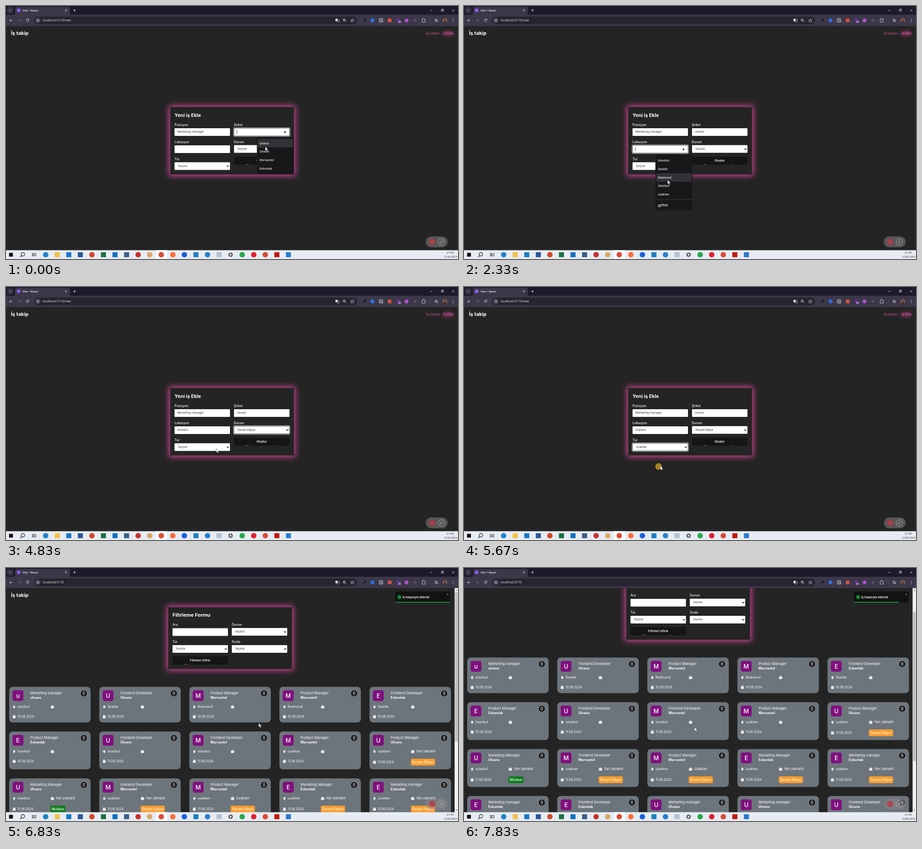
An HTML page that plays this animation: 999 px wide and 561 px high, repeating every 8 s.

```html
<!DOCTYPE html>
<html lang="tr">
<head>
<meta charset="utf-8">
<title>İş takip</title>
<style>
html, body { margin: 0; width: 100%; height: 100%; overflow: hidden; background: #242424; }
svg { display: block; width: 100vw; height: 100vh; }
text { font-family: Inter, "Open Sans", sans-serif; white-space: pre; }
.ui { font-family: "Open Sans", "Noto Sans", sans-serif; }
</style>
</head>
<body>
<svg id="stage" viewBox="0 0 999 561"></svg>
<script>
const LOOP = 8000, FPS = 6;
const DARK = '#242424', PINK = '#d6479a';
const STATES = ['Seçiniz', 'Mülakat', 'Devam Ediyor', 'Reddedildi'];
const TYPES = ['Seçiniz', 'Tam zamanlı', 'Yarı zamanlı', 'Uzaktan'];
const COMPANIES = ['ulvano', 'Ulvano', 'Morvantel', 'Eskonlab'];
const PLACES = ['istanbul', 'Seattle', 'Redmond', 'İstanbul', 'uzaktan', 'ggfffdd'];

// ---- markup helpers ----
const rect = (x, y, w, h, fill, extra = '') =>
  `<rect x="${x}" y="${y}" width="${w}" height="${h}" fill="${fill}" ${extra}/>`;
const dot = (x, y, r, fill, extra = '') => `<circle cx="${x}" cy="${y}" r="${r}" fill="${fill}" ${extra}/>`;
const line = (d, color = '#dcdae2', w = 1, extra = '') =>
  `<path d="${d}" fill="none" stroke="${color}" stroke-width="${w}" ${extra}/>`;
const text = (x, cy, s, size, fill = '#fff', weight = 400, extra = '') =>
  `<text x="${x}" y="${cy + size * 0.36}" font-size="${size}" fill="${fill}" font-weight="${weight}" ${extra}>${s}</text>`;
const group = (id, body, extra = '') => `<g id="${id}" ${extra}>${body}</g>`;
const MID = 'text-anchor="middle"', END = 'text-anchor="end"', UI = 'class="ui"';

const label = (x, y, s) => text(x, y, s, 7, '#fff', 500);
const input = (x, y, id, value = '') =>
  rect(x, y, 122.5, 17, '#fff', 'rx="1.2"') + text(x + 6, y + 8, value, 6.4, '#3c3c3c', 400, `id="${id}"`);
const select = (x, y, id) =>
  rect(x, y, 122.5, 17, '#fff', 'rx="1.2"') + text(x + 7.5, y + 8.2, 'Seçiniz', 6.1, '#333', 400, `id="${id}"`) +
  line(`M${x + 115.5} ${y + 7.4}l2.2 2.3 2.2-2.3`, '#111', 1.3);
const ring = (id, x, y, body = '') => group(id,
  rect(x - 0.2, y - 0.2, 123, 17.4, 'none', 'rx="1.5" stroke="#111" stroke-width="1"') +
  rect(x - 1, y - 1, 124.6, 19, 'none', 'rx="2" stroke="#fff" stroke-width="0.9"') + body);
const listArrow = (x, y) => `<path d="M${x + 110} ${y + 7.5}h5l-2.5 4z" fill="#111"/>`;
const caret = (x, y) => rect(x + 6, y + 4, 0.8, 9, '#222', 'data-caret=""');
const panelRow = (y0, i) => y0 + 13.2 + 18.8 * i + (i > 4 ? 4.5 : 0);
const panel = (id, x, y, h, items) => group(id,
  rect(x, y, 81.5, h, '#18171a', 'rx="2"') + rect(x + 1.5, 0, 78.5, 18.8, '#333236', `id="${id}Hover"`) +
  (items.length > 5 ? rect(x, y + 99, 81.5, 0.8, '#444348') : '') +
  items.map((s, i) => text(x + 5.8, panelRow(y, i), s, 6.4, '#e8e8ea', 600, UI)).join(''));
const popup = (id, x, y, items) => group(id,
  rect(x, y, 122.5, 41, '#fff', 'stroke="#777" stroke-width="0.7"') +
  rect(x + 0.4, 0, 121.7, 10, '#1768d0', `id="${id}Hover"`) +
  items.map((s, i) => text(x + 8, y + 6 + i * 10, s, 6.3, '#333', 400, `data-row="${i}"`)).join(''));
const box = (x, y, w, h) =>
  rect(x - 3, y - 3, w + 6, h + 6, PINK, 'filter="url(#glow)" opacity="0.95"') + rect(x, y, w, h, DARK);
const button = (x, y, s, id) => {
  const blob = (n, cx, cy) => dot(x + cx, y + cy, 11.5, PINK, `id="${id}${n}"`);
  return `<clipPath id="${id}Clip">${rect(x, y, 122.5, 18, '#000', 'rx="3"')}</clipPath>` +
    group(id, rect(x, y, 122.5, 18, '#151516') + blob('L', 29, 28.4) + blob('R', 88.5, 28.9) + blob('T', 51, -13),
      `clip-path="url(#${id}Clip)"`) +
    text(x + 61, y + 9, s, 6.3, '#fff', 600, MID);
};

// ---- page with the new-job form ----
const formPage = () => text(11, 60, 'İş takip', 11, '#fff', 700) +
  `<ellipse cx="977" cy="61" rx="13" ry="6" fill="${PINK}" opacity="0.42" filter="url(#soft)"/>` +
  text(958, 60.5, 'İş Listesi', 7.2, '#d44d95', 500, END) + text(989, 60.5, 'İş Ekle', 7, '#dd5a9f', 500, END) +
  box(363, 224, 273.5, 149.5) + text(372.5, 242, 'Yeni iş Ekle', 10.7, '#fff', 700) +
  label(372.5, 263, 'Pozisyon') + input(372.5, 271, 'position', 'Merketing manager') +
  label(503.5, 263, 'Şirket') + input(504, 271, 'company') +
  label(372.5, 301, 'Lokasyon') + input(372.5, 309, 'place') +
  label(503.5, 301, 'Durum') + select(504, 308.5, 'state') +
  label(372.5, 339, 'Tür') + select(372.5, 346.5, 'type') +
  button(504, 334, 'Oluştur', 'create') +
  ring('companyRing', 504, 271, listArrow(504, 271) + caret(504, 271)) +
  ring('placeRing', 372.5, 309, listArrow(372.5, 309) + caret(372.5, 309)) +
  ring('stateRing', 504, 308.5) + ring('typeRing', 372.5, 346.5) +
  panel('companyList', 554.5, 291, 81.5, COMPANIES) + panel('placeList', 423, 329.5, 123.5, PLACES) +
  popup('stateList', 504, 325.5, STATES) + popup('typeList', 372.5, 363, TYPES);

// ---- page with the job list ----
const JOBS = { m: 'Merketing manager', k: 'Marketing Manager', f: 'Frontend Developer', p: 'Product Manager' };
// job, company index, place index, type index, day, state index
const CARDS = [
  'm00010', 'f11010', 'p22010', 'p22010', 'f31010',
  'p33010', 'f10011', 'f20011', 'p24011', 'p142112',
  'k102111', 'f242112', 'p243112', 'k342112', 'm342112',
  'm300011', 'f300011', 'm100011', 'm100011', 'f100011'
].map(code => {
  const [job, company, place, type] = code;
  return { job: JOBS[job], company: COMPANIES[company], place: PLACES[place], type: +type,
    day: code.includes('010', 3) && code.length === 6 && code.endsWith('10') ? 10 : 11,
    state: code.length === 7 ? +code[6] : 0 };
});
const rowTop = [263.5, 362.5, 466.5, 570.5];

function card(c, i) {
  const row = Math.floor(i / 5), x = 7 + 199.1 * (i % 5), y = rowTop[row];
  const dateY = row > 1 || c.state ? 68 : 66;
  const case_ = rect(92, 42.4, 7, 5.4, '#fff', 'rx="0.8"') + line('M94 42.4v-1.4h3v1.4M93.6 42.4v5.4M97.4 42.4v5.4', '#fff', 0.7) +
    line('M93.8 42.8v5M97.2 42.8v5', '#70777e', 0.4);
  const badge = c.state && (c.state === 1
    ? rect(91, dateY - 7.5, 33.5, 15, '#0d7c1b', 'rx="3"') + text(107.7, dateY, STATES[1], 7.2, '#fff', 500, MID)
    : rect(91.5, dateY - 7.5, 53.5, 15, '#fd9d2c', 'rx="3"') + text(118.2, dateY, STATES[2], 7.2, '#fff', 500, MID));
  return `<g transform="translate(${x} ${y})">` + rect(0, 0, 180, row ? 84 : 79, '#6d757c', 'rx="8"') +
    rect(7.5, 7.5, 24, 24, '#80107f', 'rx="4.5"') + text(19.5, 19.7, c.company[0], 13, '#fff', 500, MID) +
    text(46.8, 13.6, c.job, 7.6) + text(46.8, 24, c.company, 7.3, '#fff', 700) +
    dot(165, 14.5, 7, '#050505', 'stroke="#aab0b5" stroke-width="0.6"') +
    rect(162.7, 12.4, 4.6, 5.6, 'none', 'rx="0.7" stroke="#fff" stroke-width="0.7"') +
    line('M161.8 11.5h6.4M164 10.6h2M164.2 13.8v2.8M165.8 13.8v2.8', '#fff', 0.6) +
    `<path d="M11 48.2c-1.5-2-2.3-3-2.3-4.3a2.3 2.3 0 0 1 4.6 0c0 1.3-.8 2.3-2.3 4.3z" fill="#fff"/>` +
    dot(11, 43.8, 0.8, '#6d757c') + text(18.3, 44, c.place, 7.3) + case_ +
    (c.type ? text(103, 44, TYPES[c.type], 7.5) : '') +
    rect(8, dateY - 2.6, 6, 6, '#fff', 'rx="0.7"') + line(`M9.5 ${dateY - 4}v2M12.5 ${dateY - 4}v2`, '#fff', 0.8) +
    line(`M8 ${dateY - 0.8}h6`, '#6d757c', 0.5) + text(18.3, dateY, c.day + '.08.2024', 6.9) + (badge || '') + '</g>';
}

const listPage = () => group('scroller',
    text(11, 60, 'İş takip', 11, '#fff', 700) + box(358.5, 87, 273.5, 137) +
    text(368, 104.5, 'Filtrleme Formu', 10.9, '#fff', 700) +
    label(368, 125.5, 'Ara') + input(368, 133.5, 'search') + label(499, 125.5, 'Durum') + select(499, 133, 'filterState') +
    label(368, 163.5, 'Tür') + select(368, 171, 'filterType') + label(499, 163.5, 'Sırala') + select(499, 171, 'sort') +
    button(368, 196, 'Filtreleri Sıfırla', 'reset') + CARDS.map(card).join('')) +
  rect(991.5, 44, 8, 498, '#f1f1f1') + rect(992.5, 54, 6, 331, '#bfbfbf', 'id="thumb"') +
  '<path d="M993.5 50.5l2-2.5 2 2.5zM993.5 535.5l2 2.5 2-2.5z" fill="#666"/>' +
  group('toast', rect(862, 52, 121, 25, '#121212', 'rx="2"') + rect(862, 74.8, 121, 2.2, '#12883c', 'id="progress"') +
    dot(871, 64.5, 4.2, '#14a03c') + line('M869 64.6l1.5 1.6 2.7-3', '#121212', 0.9) +
    text(878, 64.5, 'İş başarıyla eklendi', 6.4, '#fff', 600) + line('M975.8 56.8l3.4 3.4m0-3.4l-3.4 3.4', '#ccc', 0.7));

// ---- browser frame, taskbar, recorder pill ----
const browser = () => rect(0, 0, 999, 21, '#1e1a2b') + rect(0, 19.5, 999, 25, '#3c3849') +
  '<path d="M16 20q4 0 4-4V6q0-4 4-4h113q4 0 4 4v10q0 4 4 4z" fill="#3c3849"/>' +
  rect(2.5, 2.5, 13.5, 14, '#373346', 'rx="4"') + line('M7.2 8.7l2 2 2-2') +
  dot(28, 9.5, 4, '#8d5cf0') + text(36.5, 9.5, 'Vite + React', 6.1, '#fff', 600, UI) +
  line('M130.4 7.6l4 4m0-4l-4 4M151.5 7v5.4M148.8 9.7h5.4') +
  line('M937.5 9.8h5M986 7.5l4.5 4.5m0-4.5l-4.5 4.5M962 8h3.6v3.6h-3.6zM963.2 8v-1.2h3.6v3.6h-1.2', '#e6e4ea', 0.8) +
  line('M14 32H8m2.6-2.7L8 32l2.6 2.7') + line('M26.5 32h6m-2.6-2.7l2.6 2.7-2.6 2.7', '#77737f') +
  line('M50.3 30.4a2.9 2.9 0 1 0 .2 2.4M50.6 28.6v2.2h-2.3') +
  rect(62, 23.5, 714, 17, '#27232f', 'rx="8.5"') + dot(70.5, 32, 6.2, '#3c3849') +
  dot(70.5, 32, 2.9, 'none', 'stroke="#e6e4ea" stroke-width="0.8"') + line('M70.5 31.4v2M70.5 30.2v.7', '#e6e4ea', 0.8) +
  text(81, 32, '', 6.9, '#f0eff3', 400, UI + ' id="url"') +
  rect(728, 28.2, 5, 5.6, '#dcdae2', 'rx="0.8"') + rect(732, 30, 4.6, 5.6, 'none', 'rx="0.8" stroke="#dcdae2" stroke-width="0.8"') +
  dot(747.5, 31, 2.5, 'none', 'stroke="#dcdae2" stroke-width="1"') + line('M749.4 33l2.6 2.6M746.3 31h2.4') +
  line('M765.5 28l1.2 2.7 2.9.2-2.2 1.9.7 2.8-2.6-1.5-2.6 1.5.7-2.8-2.2-1.9 2.9-.2z', '#dcdae2', 0.8) +
  line('M789 35l4-4', '#111', 1.6) + dot(794, 30, 1.9, '#111') + dot(810, 32, 4.4, '#2f6fe0') +
  rect(825, 28, 7.6, 7.6, 'none', 'rx="0.8" stroke="#e6e4ea" stroke-width="0.9"') +
  dot(828.5, 31.5, 1.7, 'none', 'stroke="#e6e4ea" stroke-width="0.8"') + line('M830 33l2 2') +
  rect(844, 28, 8, 8, '#d75340', 'rx="1"') + dot(866.5, 30.5, 3, '#6a2fa8') +
  rect(865.5, 32, 8, 6.8, '#5a2a86', 'rx="1.5"') + text(869.5, 35.6, '33', 4.8, '#fff', 700, MID) +
  dot(885.3, 32, 4.3, '#b54fd2') + line('M900 32h8M904 28.5v1.5M904 34v1.5', '#8a8693', 1) +
  line('M919.7 29.3h2.2v-1a1.2 1.2 0 0 1 2.4 0v1h2.2v6.4h-6.8z', '#dcdae2', 0.9) +
  rect(937, 27, 0.7, 10, '#5a5666') + line('M947.5 29.5h6M947.5 31.7h4M947.5 34h3') + dot(953, 33.5, 1.4, '#dcdae2') +
  dot(970, 32, 5, '#8c6352') + dot(970, 30.6, 1.8, '#3a2724') + '<path d="M966.6 35.5q3.4-5 6.8 0a5 5 0 0 1-6.8 0" fill="#3a2724"/>' +
  [29, 32, 35].map(y => dot(988.5, y, 0.8, '#e6e4ea')).join('');

const APPS = ('s#111 search tasks c#1f86c9 s#f3c046 s#1a78c8 s#2b579a c#d24726 s#1e7145 s#1070c0 s#3b5f88 c#c8322e ' +
  'c#dba766 c#db4a38 c#ff6c37 c#1a5fe0 s#1f7fc4 c#2a7fd0 s#b3c0d6 gear c#25a94a c#e3202f c#db4a38 s#c3180f s#2a7ad0').split(' ');
const taskbar = () => rect(0, 541.5, 999, 20, '#e7ecf3') + rect(331, 541.5, 25, 20, '#fafcfe') +
  APPS.map((app, i) => {
    const x = 11 + 25.55 * i, y = 551.5;
    if (app === 'search') return dot(x + 0.8, y - 1, 3.9, 'none', 'stroke="#111" stroke-width="1.2"') + line(`M${x - 2} ${y + 2}l-3.2 3.2`, '#111', 1.3);
    if (app === 'tasks') return line(`M${x - 4} ${y - 4}v2h5v-2M${x - 4} ${y + 4}v-2h5v2M${x - 4} ${y}h5M${x + 4} ${y - 4}v8`, '#222', 1.1);
    if (app === 'gear') return dot(x, y, 3.2, 'none', 'stroke="#444" stroke-width="1.8"') + dot(x, y, 4.6, 'none', 'stroke="#444" stroke-width="1.2" stroke-dasharray="1.8"');
    const color = app.slice(1), r = i ? 5.6 : 4.3;
    return app[0] === 'c' ? dot(x, y, 6, color) : rect(x - r, y - r, 2 * r, 2 * r, color, 'rx="0.8"');
  }).join('') +
  text(989.5, 546.8, '21:59', 6.1, '#222', 400, `${END} ${UI}`) + text(997, 556, '12.08.2024', 5.8, '#222', 400, `${END} ${UI}`);

const recorder = () => rect(928, 511, 48, 24, '#8a8789', 'rx="12" opacity="0.52"') +
  dot(942, 523, 6.6, '#a83843', 'opacity="0.55"') + dot(942, 523, 6.2, 'none', 'stroke="#b83545" stroke-width="1.3"') +
  dot(942, 523, 3.4, '#bd3c4a') + dot(962, 523, 7, 'none', 'stroke="#b3b0b1" stroke-width="0.9"') +
  line('M959.5 525.5l5-5', '#b3b0b1', 1.6);

const pointer = () => group('arrow', '<path d="M0 0v9l2.1-1.9 1.5 3.3 1.6-.7-1.5-3.2h2.8z" fill="#fff" stroke="#222" stroke-width="0.5"/>') +
  group('hand', '<path d="M-.9 0q.9-1 1.8 0v4l3.6.8q1 .4.7 1.6l-.9 4h-4.7l-2.7-3.8q0-1.2 1.2-.8l1 .9z" fill="#fff" stroke="#222" stroke-width="0.5"/>');

document.getElementById('stage').innerHTML =
  '<defs><filter id="glow" x="-20%" y="-30%" width="140%" height="160%"><feGaussianBlur stdDeviation="6.5"/></filter>' +
  '<filter id="soft" x="-50%" y="-100%" width="200%" height="300%"><feGaussianBlur stdDeviation="3"/></filter></defs>' +
  rect(0, 0, 999, 561, DARK) + group('formPage', formPage()) + group('listPage', listPage()) +
  browser() + recorder() + taskbar() + dot(0, 0, 5, '#f6b71e', 'id="halo"') + group('pointer', pointer());

// ---- animation ----
const $ = id => document.getElementById(id);
const show = (id, on) => $(id).setAttribute('visibility', on ? 'visible' : 'hidden');
const set = (id, name, value) => $(id).setAttribute(name, value);
const clamp = v => Math.max(0, Math.min(1, v));
const ease = v => { v = clamp(v); return v * v * (3 - 2 * v); };
const mix = (a, b, k) => a + (b - a) * k;

const CLICK = { company: 450, place: 950, placePick: 2620, state: 3400, statePick: 4100, type: 4920, typePick: 5560, create: 6460 };
const PAGE_CHANGE = 6600;
const PATH = [[0, 573, 312], [350, 572, 323], [500, 572, 324], [900, 450, 318], [1050, 450, 318], [1650, 450, 386],
  [2333, 450, 386], [2560, 446, 399], [2700, 446, 399], [3000, 520, 326], [3250, 533, 318], [3450, 533, 318],
  [3667, 533, 330], [4000, 536, 351], [4170, 536, 351], [4800, 464.5, 358], [5000, 464.5, 358], [5450, 430, 398],
  [5600, 430, 398], [6250, 558, 344], [6833, 558.5, 344], [7500, 509.5, 353], [8000, 509.5, 353]];
const TOAST = [[0, 130], [6600, 130], [6760, -12], [6800, 5], [6833, -1.5], [7000, 0], [8000, 0]];

function along(keys, t) {
  const i = Math.max(1, keys.findIndex(k => k[0] > t)), a = keys[i - 1], b = keys[i];
  const k = ease((t - a[0]) / (b[0] - a[0]));
  return a.slice(1).map((v, n) => mix(v, b[n + 1], k));
}
function hoverPanel(id, top, count, y) {
  const i = Math.floor((y - top - 3.8) / 18.8);
  show(id + 'Hover', $(id).getAttribute('visibility') === 'visible' && i >= 0 && i < count);
  set(id + 'Hover', 'y', panelRow(top, i) - 9.4);
}
function hoverPopup(id, top, y) {
  const i = Math.max(0, Math.min(3, Math.floor((y - top) / 10)));
  set(id + 'Hover', 'y', top + 0.5 + i * 10);
  $(id).querySelectorAll('[data-row]').forEach(r => r.setAttribute('fill', +r.dataset.row === i ? '#fff' : '#333'));
}

function draw(t) {
  const within = (a, b) => t >= a && t < b;
  const onList = t >= PAGE_CHANGE, [x, y] = along(PATH, t);
  set('formPage', 'display', onList ? 'none' : 'inline');
  set('listPage', 'display', onList ? 'inline' : 'none');
  $('url').textContent = 'localhost:5173' + (onList ? '' : '/new');

  $('company').textContent = t >= CLICK.company ? COMPANIES[1] : '';
  $('place').textContent = t >= CLICK.placePick ? PLACES[3] : '';
  $('state').textContent = STATES[t >= CLICK.statePick ? 2 : 0];
  $('type').textContent = TYPES[t >= CLICK.typePick ? 3 : 0];
  show('companyRing', t < CLICK.place);
  show('placeRing', within(CLICK.place, CLICK.state));
  show('stateRing', within(CLICK.statePick, CLICK.type));
  show('typeRing', within(CLICK.typePick, CLICK.create));
  show('companyList', t < CLICK.company);
  show('placeList', within(CLICK.place, CLICK.placePick));
  show('stateList', within(CLICK.state, CLICK.statePick));
  show('typeList', within(CLICK.type, CLICK.typePick));
  hoverPanel('companyList', 291, 4, y);
  hoverPanel('placeList', 329.5, 5, y);
  hoverPopup('stateList', 325.5, y);
  hoverPopup('typeList', 363, y);
  const blink = t % 1000 < 500 && !within(CLICK.company, CLICK.place) && t < CLICK.placePick;
  document.querySelectorAll('[data-caret]').forEach(c => c.setAttribute('opacity', blink ? 1 : 0));

  const fill = ease((t - 6200) / 300);
  set('createL', 'cx', mix(533, 543, fill)); set('createL', 'cy', mix(362.4, 353.5, fill));
  set('createR', 'cx', mix(592.5, 585.5, fill)); set('createR', 'cy', mix(362.9, 353.5, fill));
  set('createT', 'cy', mix(321, 330, fill));

  const scroll = 65 * ease((t - 7250) / 580);
  set('scroller', 'transform', `translate(0 ${-scroll})`);
  set('thumb', 'y', 54 + scroll * 0.66);
  set('toast', 'transform', `translate(${along(TOAST, t)[0]} 0)`);
  set('progress', 'width', 121 * (1 - clamp((t - 6930) / 5000)));

  const click = Object.values(CLICK).filter(c => c <= t).pop(), age = t - click;
  show('halo', age < 400 && !onList);
  if (age < 400) {
    const [hx, hy] = along(PATH, click);
    set('halo', 'cx', hx); set('halo', 'cy', hy);
    set('halo', 'r', 4.3 + age * 0.028);
    set('halo', 'opacity', 0.95 * (1 - age / 400) ** 1.3);
  }
  const overButton = within(6100, PAGE_CHANGE);
  set('pointer', 'transform', `translate(${x} ${y})`);
  set('arrow', 'display', overButton ? 'none' : 'inline');
  set('hand', 'display', overButton ? 'inline' : 'none');
}

let start;
function tick(now) {
  start ??= now;
  draw(Math.floor(((now - start) % LOOP + 4) * FPS / 1000) * 1000 / FPS);
  requestAnimationFrame(tick);
}
draw(0);
requestAnimationFrame(tick);
</script>
</body>
</html>
```
